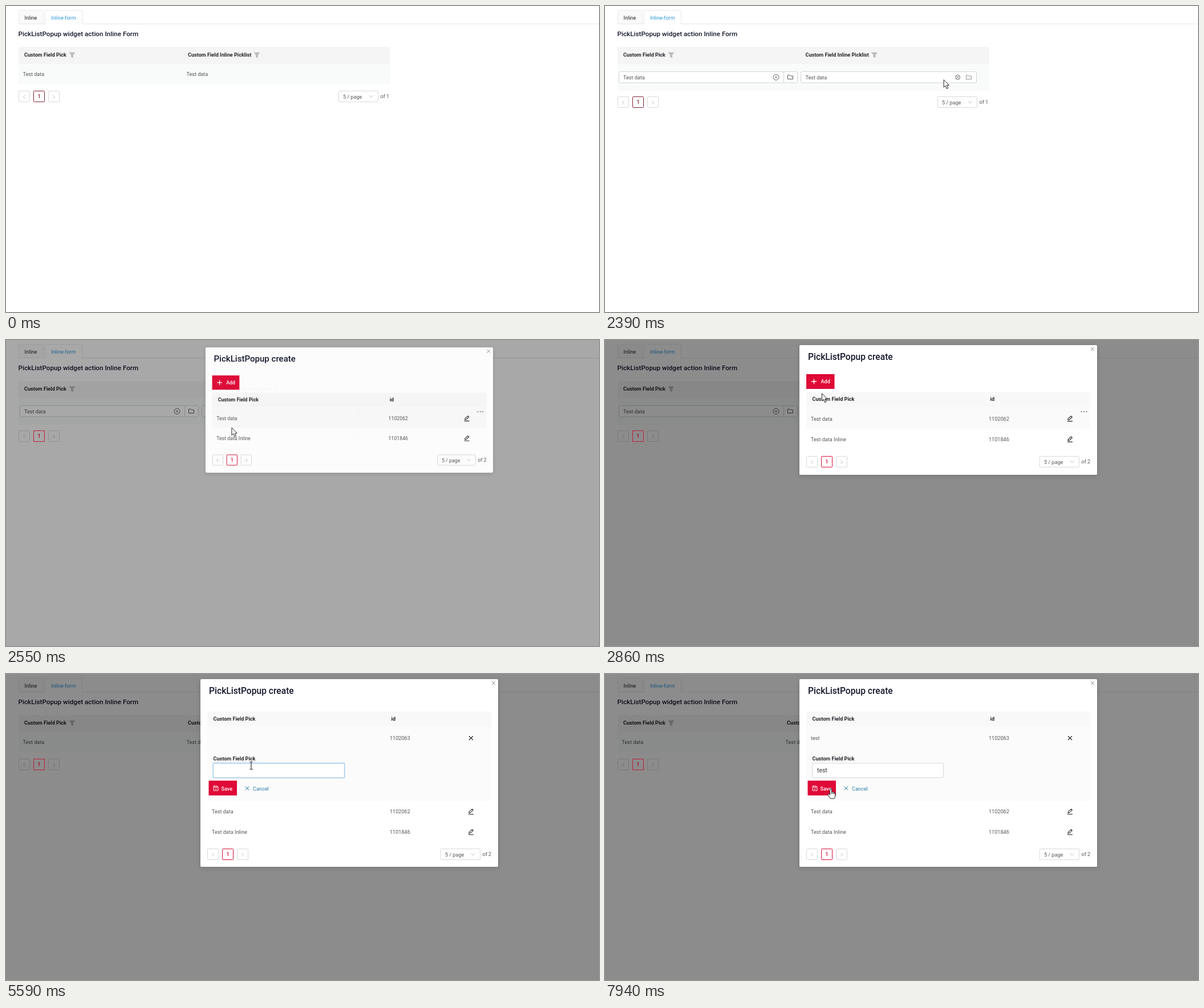
Recreate the animation shown at these times as an HTML page. Size 1040 px wide and 538 px high, loop 8 s.

```html
<!DOCTYPE html>
<html lang="en">
<head>
<meta charset="utf-8">
<title>Inline form popup</title>
<style>
html, body { margin: 0; width: 100%; height: 100%; overflow: hidden; background: #fff; }
svg { display: block; font-family: Roboto, Arial, sans-serif; }
text { white-space: pre; }
</style>
</head>
<body>
<svg id="stage" width="1040" height="538" viewBox="0 0 1040 538"></svg>
<script>
const DURATION = 8000;
const INK = '#14182b', BODY = '#555', RED = '#df0a37', LINK = '#2b7ca8';

// Markup helpers; text is placed by its left edge and vertical centre.
const text = (x, cy, label, { size = 9.1, fill = BODY, weight = 400, id = '' } = {}) =>
  `<text id="${id}" x="${x}" y="${cy + size * .355}" font-size="${size}" font-weight="${weight}" fill="${fill}">${label}</text>`;
const heading = (x, cy, label) => text(x, cy, label, { weight: 700, fill: '#25252b' });
const rect = (x, y, w, h, fill, stroke = 'none', rx = 0, extra = '') =>
  `<rect x="${x}" y="${y}" width="${w}" height="${h}" fill="${fill}" stroke="${stroke}" rx="${rx}" ${extra}/>`;
const line = (d, stroke, width = 1) =>
  `<path d="${d}" fill="none" stroke="${stroke}" stroke-width="${width}"/>`;
const at = (x, y, body) => `<g transform="translate(${x} ${y})">${body}</g>`;
const group = (id, body) => `<g id="${id}">${body}</g>`;

const cross = (x, y, r, color, width) =>
  at(x, y, line(`M${-r} ${-r}L${r} ${r}M${r} ${-r}L${-r} ${r}`, color, width));
const funnel = (x, y) =>
  at(x, y, '<path d="M-5.5-5H5.5L2-.2V4.8L-2 3.2V-.2Z" fill="#bdbdbd"/>');
const clearIcon = (x, y, r) =>
  at(x, y, `<circle r="${r}" fill="none" stroke="#555" stroke-width=".9"/>`) + cross(x, y, 2, '#555', .9);
const folder = (x, y, color, id = '') =>
  at(x, y, `<path id="${id}" d="M-4.5-3.5H-1L.5-2H4.5V3.5H-4.5Z" fill="none" stroke="${color}" stroke-width=".9"/>`);
const pencil = (x, y) =>
  at(x, y, line('M-4.5 4.5H4.5M-3.5 2.2L-3-.3 2-4.6 3.8-2.7-1.2 1.8Z', '#222', 1.1));
const ellipsis = (x, y) =>
  [-4.5, 0, 4.5].map(dx => `<circle cx="${x + dx}" cy="${y}" r="1.1" fill="#777"/>`).join('');

const activePage = (x, y, color) =>
  rect(x + .5, y - 9.5, 19, 19, '#fff', color, 1) +
  text(x + 7.6, y, '1', { fill: color, weight: 500 });

function pager(x, selectX, cy, total, color) {
  const arrow = (cx, dir) => line(`M${cx - 2 * dir} ${cy - 2.2}L${cx + 2 * dir} ${cy + .7}L${cx - 2 * dir} ${cy + 3.6}`, '#c4c4c4', .9);
  return rect(x + .5, cy - 9.5, 19, 19, '#fff', '#d9d9d9', 1) + arrow(x + 10, -1) +
    activePage(x + 26, cy, color) +
    rect(x + 52.5, cy - 9.5, 19, 19, '#fff', '#d9d9d9', 1) + arrow(x + 62, 1) +
    rect(selectX + .5, cy - 9.5, 69, 19, '#fff', '#d9d9d9', 1) +
    text(selectX + 8, cy + .4, '5 / page') +
    line(`M${selectX + 54} ${cy - 2}l3.2 4 3.2-4`, '#bbb', .9) +
    text(selectX + 73.5, cy, total);
}

const tableHead = columnX =>
  rect(22, 72, 652, 30, '#f5f5f5') +
  heading(32, 86, 'Custom Field Pick') + funnel(116, 86.5) +
  heading(columnX, 86, 'Custom Field Inline Picklist') + funnel(columnX + 121, 86.5);

const page =
  rect(22.5, 7.5, 43, 24, '#fafafa', '#ececec', 2) +
  line('M22 31.5H1040', '#e6e6e6') +
  '<path d="M68.5 32V9.5q0-2 2-2H131.5q2 0 2 2V32" fill="#fff" stroke="#e8e8e8"/>' +
  text(32.5, 20.5, 'Inline', { fill: '#222' }) +
  text(79, 20.5, 'Inline-form', { fill: '#2e98dc' }) +
  text(21.5, 48.5, 'PickListPopup widget action Inline Form', { size: 11.7, weight: 500, fill: INK });

const viewTable = tableHead(319) + rect(22, 102, 652, 36, '#f9fafa') +
  text(29.5, 120, 'Test data') + text(316.5, 120, 'Test data') +
  pager(22, 583, 159, 'of 1', '#85202f');

const editTable = tableHead(351.5) + rect(22, 102, 652, 47, '#f9fafa') +
  rect(24.5, 115.5, 313, 19.5, '#fff', '#d4d4d4', 2) + line('M313.5 115.5V135', '#d4d4d4') +
  text(32, 125.5, 'Test data') + clearIcon(300, 125.3, 5) + folder(325, 125, '#444') +
  rect(343.5, 115.5, 308, 19.5, '#fff', '#d4d4d4', 2) +
  `<path id="divider" d="M627.5 115.5V135" stroke="#d4d4d4"/>` +
  text(351.5, 125.5, 'Test data') + clearIcon(618.5, 125.3, 4) + folder(638, 125.3, '#444', 'folder') +
  pager(22, 583, 169, 'of 1', '#85202f');

const frame = height =>
  rect(341, 9, 522, height, '#fff', 'none', 2, 'filter="url(#shadow)"') +
  text(356, 29, 'PickListPopup create', { size: 15.6, weight: 500, fill: INK }) +
  cross(855, 16, 3, '#777', .8);
const popupHead = y => rect(353, y, 498, 26, '#f8f8f8') +
  heading(363.5, y + 12.7, 'Custom Field Pick') + heading(675.5, y + 12.7, 'id');
const popupRow = (cy, name, id) => text(361, cy, name) + text(673, cy, id) + pencil(815.5, cy);

const listPopup = frame(228) +
  rect(353, 60, 49.5, 26, RED) +
  line('M362 73H371M366.5 68.5V77.5', '#fff', 1.3) +
  text(378.5, 73.2, 'Add', { fill: '#fff', weight: 500 }) +
  popupHead(91.5) + rect(353, 118, 498, 38, '#fafafa') +
  popupRow(138.4, 'Test data', '1102062') + popupRow(174.6, 'Test data Inline', '1101846') +
  ellipsis(840, 126) +
  `<g id="earlyTotal">${pager(353, 762, 214, 'of 1', RED)}</g>` +
  `<g id="lateTotal">${pager(353, 762, 214, 'of 2', RED)}</g>`;

const formPopup = frame(330) + popupHead(66) +
  rect(353, 92, 498, 131, '#fbfbfb') + line('M353 131.5H851', '#f8f8f8') +
  text(361, 113, 'test', { id: 'rowName' }) + text(673, 113, '1102063') + cross(815.5, 112.7, 3.5, '#111', 1.2) +
  heading(363.5, 148.3, 'Custom Field Pick') +
  rect(363.5, 157, 230, 25.3, '#fff', '#d9d9d9', 1) +
  rect(363.2, 156.8, 230.6, 25.8, 'none', '#b5d6f0', 2, 'id="glow" stroke-width="2"') +
  text(372, 169.8, '', { size: 10.4, fill: '#333', id: 'typed' }) +
  rect(372, 163, 1, 12, '#333', 'none', 0, 'id="caret"') +
  rect(355.5, 187.5, 49.5, 26, RED) +
  at(368, 201, line('M-4-4H2.5L4-2.5V4H-4ZM-2-4V-1.5H2V-4M-1.5 1.5H1.5', '#fff', 1)) +
  text(377.5, 201.3, 'Save', { fill: '#fff', weight: 500 }) +
  cross(423, 201, 3.3, LINK, 1) + text(433, 201.3, 'Cancel', { fill: LINK }) +
  popupRow(242, 'Test data', '1102062') + popupRow(278, 'Test data Inline', '1101846') +
  pager(353, 762, 317, 'of 2', RED);

const cursors =
  group('arrow', '<path d="M0 0V13.2L3 10.5 5.2 15.8 7.5 14.8 5.3 9.7H9.3Z" fill="#fff" stroke="#222" stroke-linejoin="round"/>') +
  group('beam', line('M-2.5-6.5H-.7L0-6 .7-6.5H2.5M0-6V6M-2.5 6.5H-.7L0 6 .7 6.5H2.5', '#222', 1.1)) +
  group('hand', '<path d="M-1.4 8V1Q-1.4-.4 0-.4T1.4 1V5.5Q3 4.8 3.8 6 5.4 5.4 6 6.8 7.8 6.6 7.8 8.6V12Q7.4 14.5 6 17H-.6L-4.8 10.8Q-5.4 9-3.8 8.8Q-2.6 8.8-1.4 10.4ZM1.4 6V9M3.8 6.5V9M6 7V9.5" fill="#fff" stroke="#222" stroke-linejoin="round"/>');

document.getElementById('stage').innerHTML =
  `<defs><filter id="shadow" x="-10%" y="-15%" width="120%" height="140%">
    <feDropShadow dx="0" dy="2" stdDeviation="4" flood-opacity=".16"/></filter></defs>` +
  page + group('view', viewTable) + group('edit', editTable) +
  rect(0, 0, 1040, 538, '#000', 'none', 0, 'id="mask"') +
  ['viewActive', 'editActive'].map((id, i) => group(id,
    line(`M48.5 ${149.5 + 10 * i}h19v19h-19Z`, '#c0203a') +
    text(55.6, 159 + 10 * i, '1', { fill: '#c0203a', weight: 500 }))).join('') +
  group('list', listPopup) + group('form', formPopup) + group('cursor', cursors);

const $ = Object.fromEntries([...document.querySelectorAll('[id]')].filter(e => e.id).map(e => [e.id, e]));
const show = (id, on) => $[id].setAttribute('visibility', on ? 'inherit' : 'hidden');

// Tracks hold [time, ...values] and are read by linear interpolation.
function sample(track, t) {
  const i = track.findIndex(k => k[0] > t);
  if (i === 0) return track[0].slice(1);
  if (i < 0) return track.at(-1).slice(1);
  const a = track[i - 1], b = track[i], p = (t - a[0]) / (b[0] - a[0]);
  return a.slice(1).map((v, n) => v + (b[n + 1] - v) * p);
}

const pointer = [
  [30, 826, 440], [250, 735, 270], [450, 625, 95], [560, 592, 58], [700, 580, 100], [810, 578, 109],
  [840, 578, 109], [1230, 638, 126], [2330, 638, 126], [2390, 596, 129.5], [2450, 483, 138.5],
  [2550, 396, 154.5], [2800, 380, 100], [3090, 382, 71], [3210, 382, 71], [3900, 404, 148],
  [4380, 404, 148], [4640, 352, 207], [4900, 430, 157], [5100, 430, 157], [5250, 430, 161],
  [6860, 430, 161], [7200, 323, 216], [7510, 395, 202], [7710, 395, 202], [7940, 396, 202]];
const maskFade = [[2391, 0], [2450, .15], [2550, .34], [2630, .45]];
const popupZoom = [[2395, .3, 0], [2420, .7, .45], [2450, .85, .8], [2550, .9655, .97], [2690, 1, 1]];
const focusGlow = [[5100, 0], [5250, 1], [7710, 1], [7900, 0]];
const keyTimes = [5830, 6050, 6180, 6330];

function cursorKind(t) {
  if (t >= 1150 && t < 1940 || t >= 2960 && t < 3330 || t >= 7440) return 'hand';
  return t >= 4820 && t < 6900 ? 'beam' : 'arrow';
}

function draw(t) {
  const editing = t >= 780 && t < 3400, formOpen = t >= 3400;
  show('view', !editing);
  show('edit', editing);
  show('divider', t < 2170);
  $.folder.setAttribute('stroke', t < 2170 ? '#444' : '#888');

  $.mask.setAttribute('opacity', sample(maskFade, t)[0]);
  show('editActive', t >= 2500 && editing);
  show('viewActive', formOpen);

  const [scale, opacity] = sample(popupZoom, t);
  show('list', t >= 2396 && !formOpen);
  $.list.setAttribute('opacity', opacity);
  $.list.setAttribute('transform', `translate(602 127) scale(${scale}) translate(-602 -127)`);
  show('earlyTotal', t < 2500);
  show('lateTotal', t >= 2500);

  show('form', formOpen);
  $.glow.setAttribute('opacity', sample(focusGlow, t)[0]);
  $.typed.textContent = 'test'.slice(0, keyTimes.filter(k => t >= k).length);
  $.caret.setAttribute('opacity', t >= 5100 && t < 5590 ? 1 : 0);
  $.rowName.setAttribute('opacity', t >= 7710 ? 1 : 0);

  const kind = cursorKind(t);
  for (const id of ['arrow', 'beam', 'hand']) show(id, id === kind);
  show('cursor', t >= 30);
  $.cursor.setAttribute('transform', `translate(${sample(pointer, t).join(' ')})`);
}

function tick() {
  draw(performance.now() % DURATION);
  requestAnimationFrame(tick);
}
tick();
</script>
</body>
</html>
```
